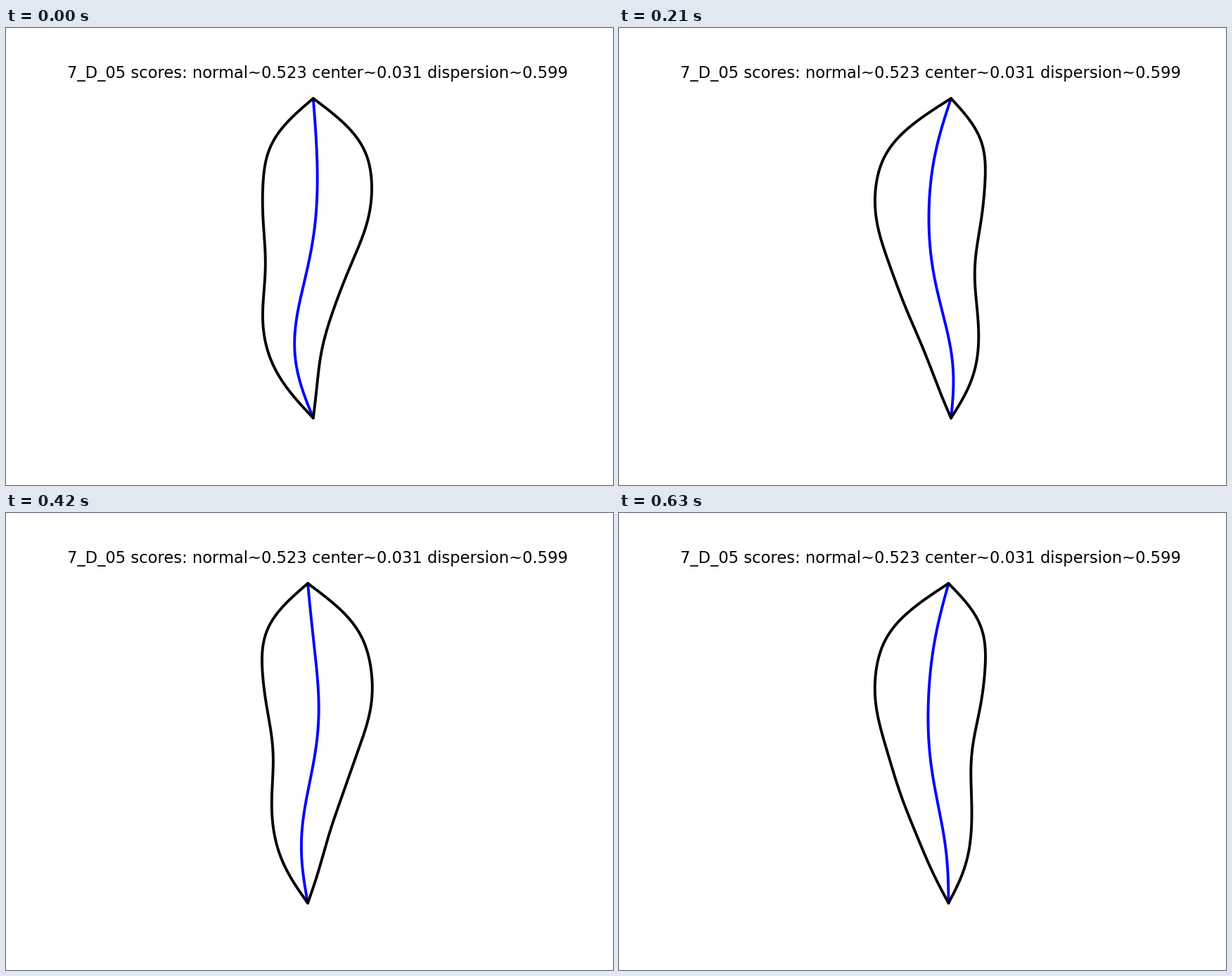
A matplotlib script that plays this animation: 863 by 649 pixels, repeating every 0.7 s.

```python
import numpy as np
import matplotlib.pyplot as plt
from matplotlib.animation import FuncAnimation

W, H, DPI = 863, 649, 64
TOP, BOTTOM, CENTER = 100, 554, 442.4
STEPS = 10
TITLE = "7_D_05 scores: normal~0.523 center~0.031 dispersion~0.599"


def pt(px):
    return px * 72 / DPI


def sines(coefs, u):
    """Sum of standing waves that vanish at both ends of the body."""
    return sum(c * np.sin((k + 1) * np.pi * u) for k, c in enumerate(coefs))


u = np.linspace(0, 1, 228)
ys = TOP + (BOTTOM - TOP) * u
half = sines([74.4, 18.1, 12.9, 2.5, 2.1, 1.0, 0.8], u)

# Key poses of the stroke: the phase turns steadily, its reach varies.
KEY_STEP = [0, 1, 3, 5, 6, 8, 9]
KEY_PHASE = [99, 11, -130, -228, -305, -432, -506]
KEY_REACH = [1.17, 1.13, 1.16, 1.34, 0.83, 0.96, 0.94]


def body(step):
    """Midline and outline x at one step, centred on the stage."""
    phase = np.radians(np.interp(step, KEY_STEP, KEY_PHASE))
    reach = np.interp(step, KEY_STEP, KEY_REACH)
    bow = -5 + 27 * reach * np.cos(phase)
    sway = 14 * reach * np.sin(phase)
    mid = sines([bow, sway, -1.9 - 0.08 * bow - 0.22 * sway,
                 -0.6 + 0.08 * sway], u)
    left, right = mid - half, mid + half
    shift = CENTER - (left.min() + right.max()) / 2
    return mid + shift, left + shift, right + shift


fig = plt.figure(figsize=(W / DPI, H / DPI), dpi=DPI, facecolor="white")
ax = fig.add_axes([0, 0, 1, 1])
ax.set(xlim=(0, W), ylim=(H, 0))
ax.axis("off")
ax.text(442.5, 71.5, TITLE, ha="center", va="baseline",
        family="DejaVu Sans", size=pt(22.65), color="black")

style = dict(lw=pt(3.9), solid_joinstyle="round", solid_capstyle="round")
midline, = ax.plot([], [], color="#0000ff", **style)
outline, = ax.plot([], [], color="black", **style)


def draw(i):
    mid, left, right = body(i % STEPS)
    midline.set_data(mid, ys)
    outline.set_data(np.r_[left, right[::-1]], np.r_[ys, ys[::-1]])
    return midline, outline


anim = FuncAnimation(fig, draw, frames=STEPS, interval=70,
                     repeat=True, repeat_delay=0)
plt.show()
```
